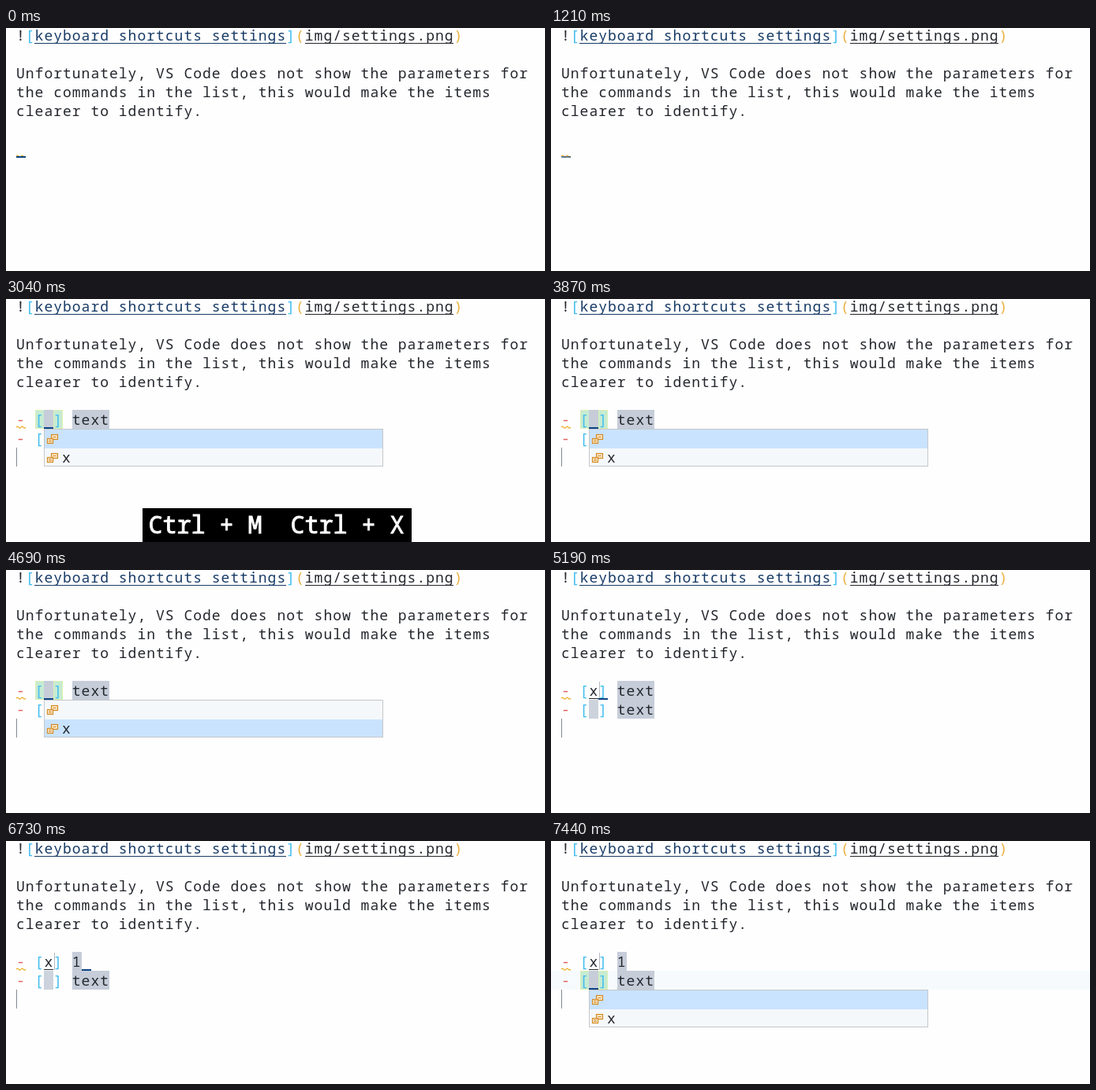
Recreate the animation shown at these times as an HTML page. Size 683 by 309 pixels, loop 7.99 s.

```html
<!DOCTYPE html>
<html lang="en">
<head>
<meta charset="utf-8">
<title>Snippet with choices</title>
<style>
  html, body { margin: 0; width: 100%; height: 100%; overflow: hidden; background: #fefefe; }
  svg { display: block; }
  text { font: 18px "Noto Sans Mono", monospace; letter-spacing: 1px; white-space: pre; fill: #24272d; }
  .keys { font-size: 30px; letter-spacing: 0; fill: #fff; stroke: #fff; stroke-width: .9px; }
</style>
</head>
<body>
<svg id="stage" width="683" height="309" viewBox="0 0 683 309"></svg>
<script>
const LOOP = 7990, LEFT = 13, CELL = 11.8, LINE = 24;
const INK = '#24272d', BLUE = '#40bdf0', GOLD = '#eab040', RED = '#e2605c', NAVY = '#0c4383';
const LINK = '#183b66', GRAY = '#c6cdd9', ICON = '#d58a1f';
const stage = document.getElementById('stage');

const col = c => LEFT + c * CELL;
const row = r => r * LINE - 3;

function add(parent, tag, attrs, content) {
  const el = document.createElementNS('http://www.w3.org/2000/svg', tag);
  for (const key in attrs) el.setAttribute(key, attrs[key]);
  if (content) el.textContent = content;
  return parent.appendChild(el);
}
const group = () => add(stage, 'g', {});
const rect = (p, x, y, width, height, fill, more) =>
  add(p, 'rect', { x, y, width, height, fill, ...more });
const write = (p, r, c, str, fill = INK) =>
  add(p, 'text', { x: col(c), y: row(r) + 18.5, style: `fill:${fill}` }, str);

// Whole-pixel background behind n cells.
function mark(p, r, c, n, fill) {
  const x = Math.round(col(c));
  return rect(p, x, row(r), Math.round(col(c + n)) - x, LINE, fill);
}

// Steps are [time, opacity, easing].
function play(el, steps) {
  const frames = steps.map(([t, opacity, easing = 'ease-in-out']) =>
    ({ offset: t / LOOP, opacity, easing }));
  el.animate(frames, { duration: LOOP, iterations: Infinity });
  return el;
}
const CUT = 'step-end';
function show(el, from, to = LOOP) {
  const steps = [[0, 0, CUT], [from, 1, CUT]];
  if (to < LOOP) steps.push([to, 0, CUT]);
  steps.push([LOOP, to < LOOP ? 0 : 1]);
  return play(el, steps);
}

function caret(r, c, steps) {
  const x = Math.round(col(c));
  play(rect(stage, x, row(r) + 22, 12, 2, NAVY), steps);
}

function brackets(p, r) {
  for (const c of [2, 4]) {
    mark(p, r, c, 1, '#dcefb4');
    rect(p, Math.round(col(c)) + 1, row(r) + 1, 10, LINE - 2, '#c6ebd2');
  }
  mark(p, r, 3, 1, GRAY);
}

function icon(p, y) {
  const box = { stroke: ICON, 'stroke-width': 1.2 };
  rect(p, 57.5, y + 7.5, 8, 6, '#fbe8cc', box);
  rect(p, 52.5, y + 12.5, 7, 6, '#fdf3e4', box);
  add(p, 'path', {
    d: `M59.5 ${y + 10.5}h4M54 ${y + 14.5}h4M54 ${y + 16.5}h4`,
    stroke: ICON, 'stroke-width': 1, fill: 'none'
  });
}

function popup(y) {
  const p = group();
  rect(p, 48.5, y + .5, 429, 47, '#f5f8fb', { stroke: '#c5c7ca' });
  const picks = [rect(p, 49, y + 1, 428, 24, '#c9e3fe'), rect(p, 49, y + 25, 428, 22, '#c9e3fe')];
  icon(p, y);
  icon(p, y + LINE);
  add(p, 'text', { x: 71, y: y + 43 }, 'x');
  return { p, picks };
}

// Document text
const doc = group();
write(doc, 0, 0, '!');
write(doc, 0, 1, '[', BLUE);
write(doc, 0, 2, 'keyboard shortcuts settings', LINK);
write(doc, 0, 29, ']', BLUE);
write(doc, 0, 30, '(', GOLD);
write(doc, 0, 31, 'img/settings.png');
write(doc, 0, 47, ')', GOLD);
rect(doc, 36, 19, 319, 1, LINK);
rect(doc, 379, 19, 188, 1, INK);
write(doc, 2, 0, 'Unfortunately, VS Code does not show the parameters for');
write(doc, 3, 0, 'the commands in the list, this would make the items');
write(doc, 4, 0, 'clearer to identify.');

// Backgrounds of the snippet
const SNIP = 3040, CHOSEN = 5190, TAB = 6060, TYPED = 6730, NEXT = 7440;

const lineTint = group();
rect(lineTint, 0, row(7), 683, LINE, '#f6fafd');
show(lineTint, NEXT);

const first = group();
brackets(first, 6);
show(first, SNIP, CHOSEN);
const second = group();
brackets(second, 7);
show(second, NEXT);

show(mark(stage, 7, 3, 1, '#cdd3dc'), CHOSEN, NEXT);
show(mark(stage, 6, 6, 4, GRAY), SNIP, TAB);
show(mark(stage, 6, 6, 4, '#adbfdc'), TAB, TYPED);
show(mark(stage, 6, 6, 1, GRAY), TYPED);
show(mark(stage, 7, 6, 4, GRAY), SNIP);
show(mark(stage, 7, 6, 4, '#9fc9ba'), TAB, TYPED);

// Snippet text
const snip = group();
for (const r of [6, 7]) {
  write(snip, r, 0, '-', RED);
  write(snip, r, 2, '[', BLUE);
  write(snip, r, 4, ']', BLUE);
}
write(snip, 7, 6, 'text');
rect(snip, 13, row(8), 1, LINE, '#85898f');
show(snip, SNIP);

const done = group();
write(done, 6, 3, 'x');
rect(done, 48, 163, 12, 1, INK);
rect(done, 61, 142, 1, 22, '#b4b8be');
show(done, CHOSEN);

show(write(stage, 6, 6, 'text'), SNIP, TYPED);
show(write(stage, 6, 6, '1'), TYPED);

add(stage, 'path', {
  d: 'M13 163.2q1.5 -2 3 0t3 0t3 0t3 0',
  stroke: '#efb02c', 'stroke-width': 1.3, fill: 'none'
});

// Choice lists
const listA = popup(165);
show(listA.p, SNIP, CHOSEN);
show(listA.picks[0], SNIP, 4690);
show(listA.picks[1], 4690, CHOSEN);
const listB = popup(189);
listB.picks[1].remove();
show(listB.p, NEXT);

// Carets
caret(6, 0, [
  [0, 1], [100, 1], [310, 0], [570, 0], [790, 1], [1090, 1], [1380, 0, CUT],
  [1520, 1], [2110, 1], [2330, 0, CUT], [2470, 1], [2940, 1],
  [SNIP, .5], [SNIP, 0], [LOOP, 0]
]);
caret(6, 3, [
  [0, 0, CUT], [SNIP, 1], [3870, 1], [4070, 0], [4350, 0], [4510, 1],
  [4870, 1], [5070, 0], [LOOP, 0]
]);
caret(6, 4, [[0, 0, CUT], [CHOSEN, 1], [5670, 1], [5870, 0], [LOOP, 0]]);
caret(6, 10, [[0, 0, CUT], [TAB, 1], [6610, 1], [TYPED, .4], [TYPED, 0], [LOOP, 0]]);
caret(6, 7, [[0, 0, CUT], [TYPED, 1], [7260, 1], [NEXT, 0], [LOOP, 0]]);
caret(7, 3, [[0, 0, CUT], [NEXT, 1], [LOOP, 1]]);

// Pressed keys
const keys = group();
rect(keys, 173, 266, 341, 43, '#000');
add(keys, 'text', { x: 180.5, y: 298, class: 'keys' }, 'Ctrl + M  Ctrl + X');
show(keys, 2110, 3140);
</script>
</body>
</html>
```
